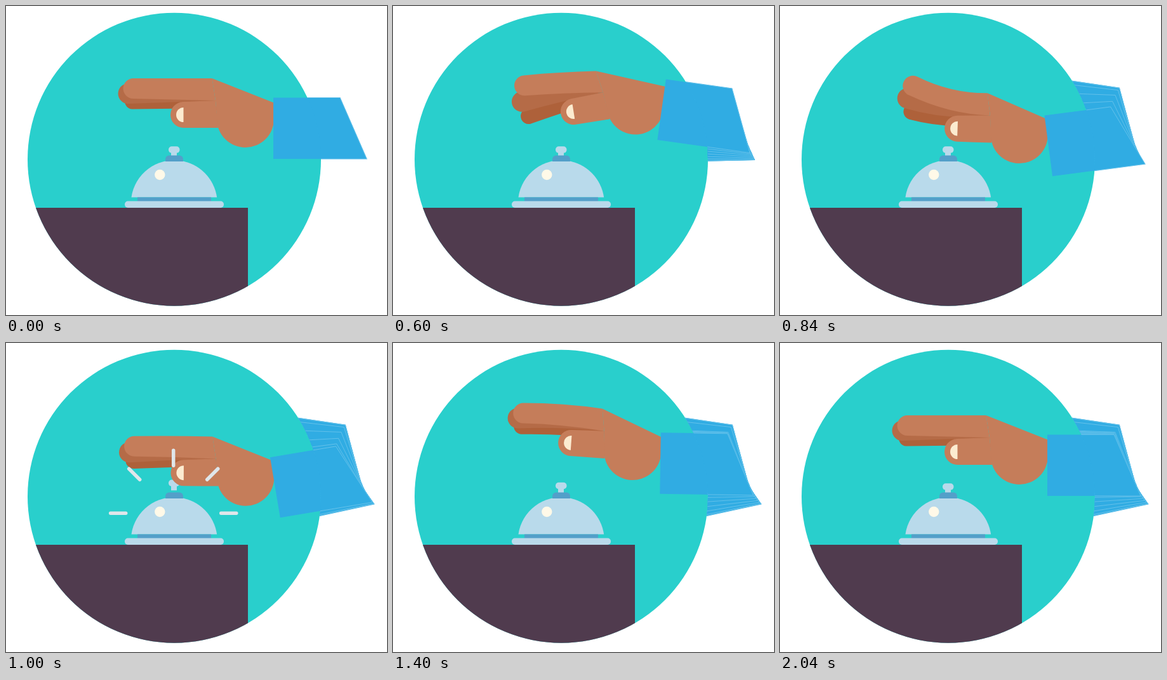
Animation of 600 by 487 pixels, one loop 2080 ms. Source, as an HTML page with a canvas:

```html
<!DOCTYPE html>
<html lang="en">
<head>
<meta charset="utf-8">
<title>Service bell</title>
<style>
  html, body { margin: 0; width: 100%; height: 100%; overflow: hidden; background: #fff; }
  canvas { display: block; width: 100%; height: 100%; }
</style>
</head>
<body>
<canvas id="stage" width="600" height="487"></canvas>
<script>
const ctx = document.getElementById('stage').getContext('2d');
const LOOP = 2080, STEP = 40, SETTLED = 1600;
const RAD = Math.PI / 180, TAU = Math.PI * 2;
const COLOR = {
  disc: '#29cfcc', table: '#503b4e', sleeve: '#30ace3',
  skin: '#c57d5a', skinMid: '#b56b47', skinDark: '#ae613a', nail: '#fcebd0',
  bell: '#b9daeb', bellDark: '#539fc9', shine: '#fff9e8', ray: '#dfe6ea'
};

// Joint angles in degrees; bow curves the fingers, spread fans them out.
const REST = { arm: 0, wrist: 0, curl: 0, bow: 0, spread: 0 };
const KEYS = [
  { at: 0, ...REST },
  { at: 320, arm: -1.3, wrist: -8, curl: 0, bow: -9, spread: 0.1 },
  { at: 600, arm: 8, wrist: -17, curl: 5, bow: -2, spread: 1.1 },
  { at: 680, arm: 8.4, wrist: -2, curl: 20, bow: 10, spread: 0.4 },
  { at: 840, arm: -7.5, wrist: 9.5, curl: 11, bow: 14, spread: 0.8 },
  { at: 920, arm: -12.3, wrist: 10, curl: 0, bow: 4, spread: 0.2 },
  { at: 1200, arm: 1.8, wrist: 8, curl: 0, bow: -9, spread: 0.1 },
  { at: SETTLED, ...REST }
];

// Smooth path through the keys that pauses at each turning point.
function poseAt(time) {
  if (time >= SETTLED) return REST;
  const i = KEYS.findLastIndex(key => key.at <= time);
  const from = KEYS[i], to = KEYS[i + 1];
  const span = to.at - from.at, u = (time - from.at) / span;
  const slope = (k, joint) => {
    const before = KEYS[k - 1], here = KEYS[k], after = KEYS[k + 1];
    if (!before || !after) return 0;
    const passing = (here[joint] - before[joint]) * (after[joint] - here[joint]) > 0;
    return passing ? (after[joint] - before[joint]) / (after.at - before.at) : 0;
  };
  const pose = {};
  for (const joint in REST) {
    pose[joint] = from[joint] + (to[joint] - from[joint]) * u * u * (3 - 2 * u)
      + span * slope(i, joint) * u * (1 - u) ** 2
      - span * slope(i + 1, joint) * u * u * (1 - u);
  }
  return pose;
}

function shape(color, draw) {
  ctx.fillStyle = color;
  ctx.beginPath();
  draw();
  ctx.fill();
}
const circle = (color, x, y, r) => shape(color, () => ctx.arc(x, y, r, 0, TAU));
const box = (color, x, y, w, h, r = 0) => shape(color, () => ctx.roundRect(x, y, w, h, r));
const disc = () => ctx.arc(265, 241.7, 231, 0, TAU);

function jointed(x, y, degrees, draw) {
  ctx.save();
  ctx.translate(x, y);
  ctx.rotate(degrees * RAD);
  draw();
  ctx.restore();
}
// The whole arm turns about an elbow beyond the right edge.
const onArm = (pose, draw) => jointed(633, 193, pose.arm, draw);

// Round tip whose two edges run tangentially to the points top and bottom.
function finger(color, tip, r, top, bottom, bow = 0) {
  const edge = (end, side) => {
    const tangent = p => Math.atan2(p[1] - tip[1], p[0] - tip[0])
      + side * Math.acos(r / Math.hypot(p[0] - tip[0], p[1] - tip[1]));
    const first = tangent(end);
    const control = [(tip[0] + r * Math.cos(first) + end[0]) / 2,
                     (tip[1] + r * Math.sin(first) + end[1]) / 2 + bow];
    return { control, angle: tangent(control) };
  };
  const upper = edge(top, -1), lower = edge(bottom, 1);
  shape(color, () => {
    ctx.moveTo(...top);
    ctx.quadraticCurveTo(...upper.control,
      tip[0] + r * Math.cos(upper.angle), tip[1] + r * Math.sin(upper.angle));
    ctx.arc(...tip, r, upper.angle, lower.angle, true);
    ctx.quadraticCurveTo(...lower.control, ...bottom);
  });
}

function drawSleeve() {
  shape(COLOR.sleeve, () => {
    ctx.moveTo(-212, -48.5);
    ctx.lineTo(-107, -48.5);
    ctx.lineTo(-65, 48);
    ctx.lineTo(-212, 48);
    ctx.closePath();
  });
}

function outline(color, width) {
  ctx.strokeStyle = color;
  ctx.lineWidth = width;
  ctx.stroke();
}

// Outside the disc every earlier sleeve stays visible, with a pale seam.
function drawTrail(time) {
  ctx.save();
  ctx.beginPath();
  ctx.rect(0, 0, 600, 487);
  disc();
  ctx.clip('evenodd');
  for (let past = 0; past <= Math.min(time, SETTLED); past += STEP) {
    onArm(poseAt(past), () => {
      drawSleeve();
      outline(COLOR.sleeve, 1.2);
      outline('rgba(255,255,255,.4)', 0.6);
    });
  }
  ctx.restore();
}

// Drawn around the centre of the palm.
function drawHand({ curl, bow, spread }) {
  const knuckle = [-52.5, -64], crease = [-47, -29], heel = [-43, 14], thumb = [-97.5, -6.5];
  const reach = 125 - 9 * spread, angle = (172.6 + curl) * RAD;
  const tip = [knuckle[0] + reach * Math.cos(angle), knuckle[1] + reach * Math.sin(angle)];
  const beside = (dx, dy) => [tip[0] + dx, tip[1] + dy];

  finger(COLOR.skinDark, beside(-1, 20 + 26 * spread), 12.5, crease, [crease[0], crease[1] + 12], bow);
  finger(COLOR.skinMid, beside(-8, 8 + 15 * spread), 16, crease, crease, bow);
  finger(COLOR.skin, tip, 16, knuckle, crease, bow);
  shape(COLOR.skin, () => {
    ctx.moveTo(...knuckle);
    ctx.lineTo(60, -19.5);
    ctx.arc(0, 0, 45, 0, Math.PI);
    ctx.lineTo(...crease);
  });
  finger(COLOR.skin, thumb, 20.5, crease, heel);
  shape(COLOR.nail, () => ctx.arc(...thumb, 11.5, Math.PI / 2, Math.PI * 1.5));
}

function drawArm(pose) {
  onArm(pose, () => {
    jointed(-205, -15, pose.wrist, () => {
      ctx.translate(-51, 0);
      drawHand(pose);
    });
    drawSleeve();
  });
}

function drawScene() {
  shape(COLOR.disc, disc);
  ctx.save();
  ctx.beginPath();
  disc();
  ctx.clip();
  box(COLOR.table, 0, 318, 381, 169);
  ctx.restore();
}

function drawBell(time) {
  const ring = time - 900;
  const knob = ring >= 0 && ring < 600 ? 8 * Math.exp(-ring / 300) * Math.cos(ring * Math.PI / 100) : 0;
  box(COLOR.bell, 260, 228 + knob, 9, 10);
  box(COLOR.bell, 256, 221.3 + knob, 17.5, 10.4, 5);
  const low = Math.asin(-9.5 / 68);
  shape(COLOR.bell, () => ctx.arc(264.8, 311, 68, Math.PI - low, TAU + low));
  box(COLOR.bellDark, 251, 235.5, 28, 9.5, [6, 6, 0, 0]);
  box(COLOR.bellDark, 207, 301.5, 116, 6.5);
  box(COLOR.bell, 187, 307.5, 156, 10.5, 5);
  circle(COLOR.shine, 242.3, 266, 8.2);
}

function drawRays(time) {
  if (time <= 960 || time >= 1400) return;
  const grow = Math.min(1, (time - 960) / 280);
  const outer = 75 + 65 * (1 - (1 - grow) ** 3);
  const inner = 75 + 65 * Math.max(0, (time - 1040) / 360);
  ctx.lineCap = 'round';
  ctx.beginPath();
  for (let degrees = 180; degrees <= 360; degrees += 45) {
    const c = Math.cos(degrees * RAD), s = Math.sin(degrees * RAD);
    ctx.moveTo(263.7 + inner * c, 268.3 + inner * s);
    ctx.lineTo(263.7 + outer * c, 268.3 + outer * s);
  }
  outline(COLOR.ray, 5.5);
}

function render(now) {
  const time = Math.floor((now % LOOP) / STEP) * STEP;
  ctx.clearRect(0, 0, 600, 487);
  drawScene();
  drawBell(time);
  drawArm(poseAt(time));
  drawTrail(time);
  drawRays(time);
}

const start = performance.now();
function tick() {
  render(performance.now() - start);
  requestAnimationFrame(tick);
}
tick();
</script>
</body>
</html>
```
